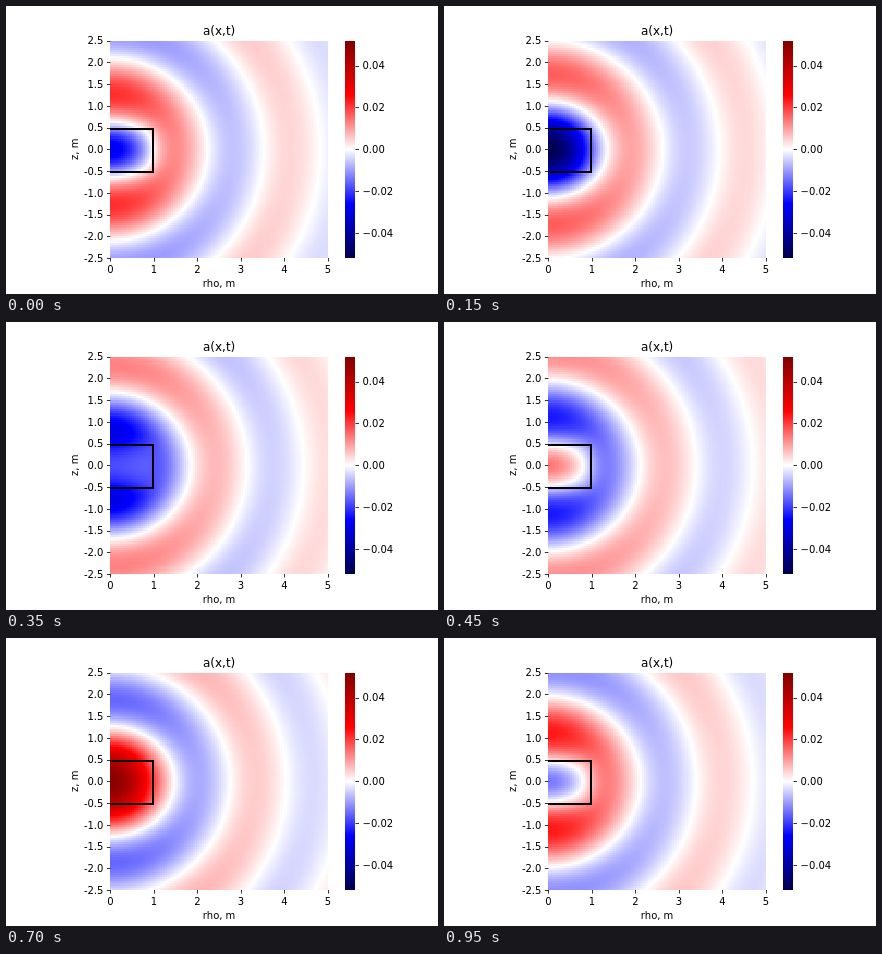
Recreate the animation shown at these times as an HTML page with a canvas. Size 432 by 288 pixels, loop 1000 ms.

```html
<!DOCTYPE html>
<html>
<head>
<meta charset="utf-8">
<style>
  html, body { margin: 0; width: 100%; height: 100%; overflow: hidden; background: #fff; }
  canvas { display: block; }
</style>
</head>
<body>
<canvas id="stage" width="432" height="288"></canvas>
<script>
const ctx = document.getElementById('stage').getContext('2d');
const LEFT = 104.4, TOP = 34.56, SIZE = 217.44, BOTTOM = TOP + SIZE, MID = TOP + SIZE / 2;
const BAR = 338.6, BAR_W = 10.9, V_MAX = 0.052;
const N = 100, HALF = N / 2, CELL = 0.05, K = 2.4, STEPS = 20;
const CENTRE_PEAK = 3.15; // step at which the centre is most negative

// Diverging colour map, v in -1..1
const STOPS = [[0, 0, 77], [0, 0, 255], [255, 255, 255], [255, 0, 0], [128, 0, 0]];
function colour(v) {
  const p = Math.max(0, Math.min(3.9999, 2 * v + 2)), i = Math.floor(p);
  return STOPS[i].map((c, j) => c + (STOPS[i + 1][j] - c) * (p - i));
}

// Uniform oscillating cylinder: rho < 1, |z| < 0.5 (half the angles, by symmetry)
const sources = [];
for (let i = 0; i < 10; i++)
  for (let j = 0; j < 16; j++)
    for (let k = 0; k < 10; k++) {
      const r = (i + 0.5) / 10, phi = (j + 0.5) * Math.PI / 16;
      sources.push([r * Math.cos(phi), r * Math.sin(phi), (k + 0.5) / 10 - 0.5, r]);
    }

// Complex retarded potential at (rho, z)
function potential(rho, z) {
  let re = 0, im = 0;
  for (const [x, y, h, w] of sources) {
    const d = Math.sqrt((rho - x) ** 2 + y * y + (z - h) ** 2);
    re += w * Math.cos(K * d) / d;
    im += w * Math.sin(K * d) / d;
  }
  return [re, im];
}

const re = new Float32Array(N * HALF), im = new Float32Array(N * HALF);
for (let j = 0; j < HALF; j++)
  for (let i = 0; i < N; i++)
    [re[j * N + i], im[j * N + i]] = potential((i + 0.5) * CELL, (j + 0.5) * CELL);
const peak = Math.hypot(re[0], im[0]), lag = Math.atan2(im[0], re[0]);

const map = document.createElement('canvas');
map.width = map.height = N;
const mapCtx = map.getContext('2d'), img = mapCtx.createImageData(N, N);

function drawField(step) {
  const phase = 2 * Math.PI * (step - CENTRE_PEAK) / STEPS + lag;
  const c = -Math.cos(phase) / peak, s = -Math.sin(phase) / peak;
  for (let j = 0; j < HALF; j++)
    for (let i = 0; i < N; i++) {
      const n = j * N + i, rgba = [...colour(re[n] * c + im[n] * s), 255];
      img.data.set(rgba, ((HALF + j) * N + i) * 4);
      img.data.set(rgba, ((HALF - 1 - j) * N + i) * 4);
    }
  mapCtx.putImageData(img, 0, 0);
  ctx.drawImage(map, 104, 35, 218, 217);
}

function line(width, ...pts) {
  ctx.lineWidth = width;
  ctx.beginPath();
  pts.forEach(([x, y]) => ctx.lineTo(x, y));
  ctx.stroke();
}

function text(str, x, y, align = 'center', size = 10) {
  ctx.font = size + 'px "DejaVu Sans", sans-serif';
  ctx.textAlign = align;
  ctx.fillText(str, x, y);
}

const snap = v => Math.round(v) + 0.5;

function drawAxes() {
  ctx.fillStyle = ctx.strokeStyle = '#000';
  for (let i = 0; i <= 5; i++) {
    const x = LEFT + i * SIZE / 5;
    line(0.8, [snap(x), BOTTOM], [snap(x), BOTTOM + 3.5]);
    text(i, x, 267);
  }
  for (let i = -5; i <= 5; i++) {
    const y = MID - i * SIZE / 10;
    line(0.8, [LEFT - 3.5, snap(y)], [LEFT, snap(y)]);
    text((i / 2).toFixed(1), LEFT - 7, y + 3.8, 'right');
  }
  for (let i = -2; i <= 2; i++) {
    const y = MID - i * 0.02 / V_MAX * SIZE / 2, x = BAR + BAR_W;
    line(0.8, [x, snap(y)], [x + 3.5, snap(y)]);
    text((i < 0 ? '\u2212' : '') + Math.abs(i * 0.02).toFixed(2), x + 7, y + 3.8, 'left');
  }
  text('a(x,t)', LEFT + SIZE / 2, 28.5, 'center', 12);
  text('rho, m', LEFT + SIZE / 2, 281);
  ctx.save();
  ctx.translate(71.5, MID);
  ctx.rotate(-Math.PI / 2);
  text('z, m', 0, 0);
  ctx.restore();
}

function drawBar() {
  const g = ctx.createLinearGradient(0, BOTTOM, 0, TOP);
  STOPS.forEach((c, i) => g.addColorStop(i / 4, `rgb(${c})`));
  ctx.fillStyle = g;
  ctx.fillRect(339, 35, 10, 217);
}

let shown = -1;
function frame() {
  const step = Math.floor(performance.now() % 1000 / 1000 * STEPS);
  if (step !== shown) {
    shown = step;
    ctx.fillStyle = '#fff';
    ctx.fillRect(0, 0, 432, 288);
    ctx.imageSmoothingEnabled = false;
    drawField(step);
    drawBar();
    drawAxes();
    line(2, [104, 123], [147, 123], [147, 166], [104, 166]);
  }
  requestAnimationFrame(frame);
}
frame();
</script>
</body>
</html>
```
